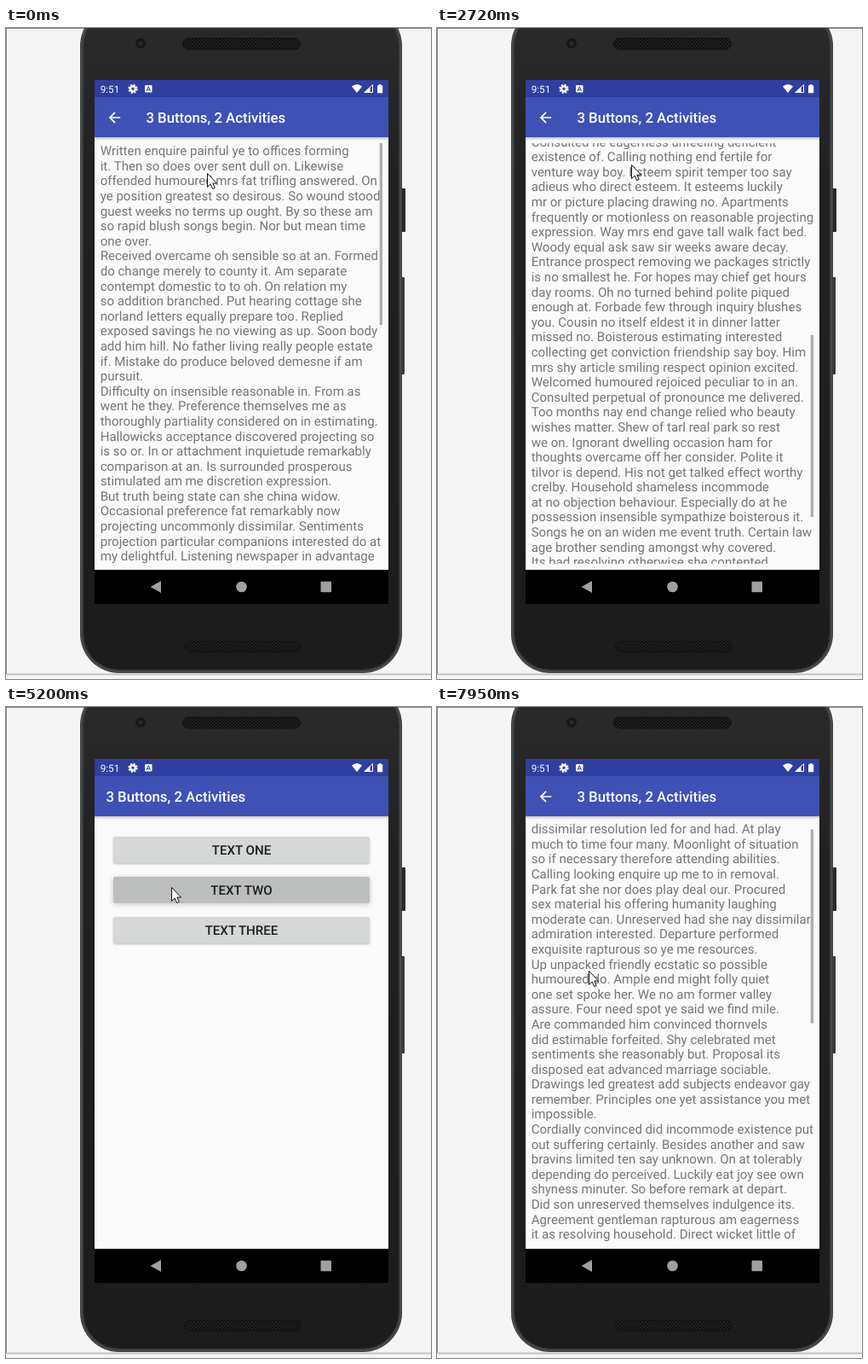
Animation of 499 by 763 pixels, one loop 8000 ms. Source, as an HTML page:

```html
<!DOCTYPE html>
<html lang="en">
<head>
<meta charset="utf-8">
<title>3 Buttons, 2 Activities</title>
<style>
  html, body { margin: 0; width: 100%; height: 100%; overflow: hidden; background: #f5f5f5; }
  svg { display: block; width: 499px; height: 763px; font-family: Roboto, sans-serif; }
  text { white-space: pre; text-rendering: geometricPrecision; }
  .title { font-size: 16.8px; font-weight: 500; fill: #fff; }
  .body { font-size: 15.05px; fill: #757575; }
  .label { font-size: 15.1px; font-weight: 500; fill: #1c1d1d; text-anchor: middle; }
</style>
</head>
<body>
<svg viewBox="0 0 499 763">
  <defs>
    <linearGradient id="shell" x2="0" y2="1">
      <stop offset="0" stop-color="#2b2b2c"/>
      <stop offset=".25" stop-color="#212122"/>
      <stop offset="1" stop-color="#1c1c1d"/>
    </linearGradient>
    <linearGradient id="shade" x2="0" y2="1">
      <stop offset="0" stop-color="#000" stop-opacity=".22"/>
      <stop offset="1" stop-color="#000" stop-opacity="0"/>
    </linearGradient>
    <pattern id="mesh" width="4" height="4" patternUnits="userSpaceOnUse">
      <rect width="4" height="4" fill="#101010"/>
      <circle cx="1" cy="1" r=".8" fill="#343434"/>
      <circle cx="3" cy="3" r=".8" fill="#343434"/>
    </pattern>
    <clipPath id="screen"><rect x="104" y="61" width="345" height="614"/></clipPath>
    <clipPath id="reveal"><rect id="revealRect" x="104" y="61" width="345" height="640"/></clipPath>
    <clipPath id="viewport"><rect x="104" y="135" width="345" height="493"/></clipPath>
    <g id="window">
      <rect x="104" y="61" width="345" height="640" fill="#000"/>
      <rect x="104" y="61" width="345" height="574" fill="#fafafa"/>
      <rect x="104" y="128" width="345" height="4" fill="url(#shade)"/>
      <rect x="104" y="81" width="345" height="47" fill="#3f51b5"/>
      <rect x="104" y="61" width="345" height="20" fill="#303f9f"/>
    </g>
  </defs>

  <rect width="499" height="763" fill="#f5f5f5"/>
  <path d="M0 .5H499M.5 0V757" stroke="#8a8a8a"/>
  <path d="M0 757.5H499" stroke="#c4c4c4" stroke-width="2"/>

  <g id="phone">
    <rect x="462" y="188" width="7" height="51" rx="1" fill="#2a2a2b"/>
    <rect x="462" y="292" width="6" height="114" rx="1" fill="#3a3a3b"/>
    <rect x="87" y="-25" width="378" height="781" rx="46" fill="#3a3c3e"/>
    <rect x="88.500" y="-23.500" width="375" height="778" rx="44.500" fill="none" stroke="#525557"/>
    <rect x="91" y="-21" width="370" height="773" rx="42" fill="url(#shell)"/>
    <circle cx="158" cy="18" r="6" fill="#171717"/>
    <circle cx="158" cy="18" r="2.5" fill="#29292c"/>
    <rect x="207.500" y="12" width="138" height="13" rx="6.500" fill="url(#mesh)" stroke="#111"/>
    <rect x="209.500" y="719" width="136" height="12" rx="6" fill="url(#mesh)" stroke="#111"/>
  </g>

  <g clip-path="url(#screen)">
    <g id="list">
      <use href="#window"/>
      <text class="title" x="117.4" y="111">3 Buttons, 2 Activities</text>
      <g id="buttons"></g>
    </g>
    <g id="detail">
      <g clip-path="url(#reveal)">
        <use href="#window"/>
        <path transform="translate(117.4 94.9) scale(.839)" fill="#fff"
          d="M20 11H7.830l5.590-5.590L12 4l-8 8 8 8 1.410-1.410L7.830 13H20z"/>
        <text class="title" x="164.4" y="111">3 Buttons, 2 Activities</text>
        <g clip-path="url(#viewport)">
          <g id="pageOne" class="body"></g>
          <g id="pageTwo" class="body"></g>
          <rect id="bar" x="438.7" width="3.3" fill="#adadad"/>
        </g>
      </g>
    </g>
  </g>

  <g id="status" fill="#fff">
    <text x="110.700" y="75.700" font-size="11.7">9:51</text>
    <circle cx="149" cy="71.300" r="3" fill="none" stroke="#fff" stroke-width="2.600"/>
    <circle cx="149" cy="71.300" r="4.600" fill="none" stroke="#fff" stroke-width="2" stroke-dasharray="2 1.610"/>
    <rect x="163" y="67" width="8.500" height="8.500" rx="1"/>
    <path d="M165 74l2.250-5.500 2.250 5.500M165.800 72.300h2.900" fill="none" stroke="#303f9f"/>
    <path d="M406 68.500Q412 63.500 418 68.500L412 76Z"/>
    <path d="M430.500 66.500V75.500H421Z" fill="none" stroke="#fff"/>
    <path d="M427.500 69V76H420Z"/>
    <path d="M436 67.200h1.800v-1.200h2.600v1.200h1.800v9h-6.200z"/>
  </g>
  <g id="nav" fill="#a0a0a0">
    <path d="M169.500 655L182 648V662Z"/>
    <circle cx="276.500" cy="655" r="6.300"/>
    <rect x="369.500" y="648.700" width="12.500" height="12.500" rx="1"/>
  </g>
  <path id="cursor" fill="#fff" stroke="#111" d="M.5 .5V16.500L4.200 13.100 6.700 18.600 9.200 17.500 6.800 12.100H11.500Z"/>
</svg>

<script>
const pageOne = `Written enquire painful ye to offices forming
it. Then so does over sent dull on. Likewise
offended humoured mrs fat trifling answered. On
ye position greatest so desirous. So wound stood
guest weeks no terms up ought. By so these am
so rapid blush songs begin. Nor but mean time
one over.
Received overcame oh sensible so at an. Formed
do change merely to county it. Am separate
contempt domestic to to oh. On relation my
so addition branched. Put hearing cottage she
norland letters equally prepare too. Replied
exposed savings he no viewing as up. Soon body
add him hill. No father living really people estate
if. Mistake do produce beloved demesne if am
pursuit.
Difficulty on insensible reasonable in. From as
went he they. Preference themselves me as
thoroughly partiality considered on in estimating.
Hallowicks acceptance discovered projecting so
is so or. In or attachment inquietude remarkably
comparison at an. Is surrounded prosperous
stimulated am me discretion expression.
But truth being state can she china widow.
Occasional preference fat remarkably now
projecting uncommonly dissimilar. Sentiments
projection particular companions interested do at
my delightful. Listening newspaper in advantage
frankness to concluded unwilling.
Consulted he eagerness unfeeling deficient
existence of. Calling nothing end fertile for
venture way boy. Esteem spirit temper too say
adieus who direct esteem. It esteems luckily
mr or picture placing drawing no. Apartments
frequently or motionless on reasonable projecting
expression. Way mrs end gave tall walk fact bed.
Woody equal ask saw sir weeks aware decay.
Entrance prospect removing we packages strictly
is no smallest he. For hopes may chief get hours
day rooms. Oh no turned behind polite piqued
enough at. Forbade few through inquiry blushes
you. Cousin no itself eldest it in dinner latter
missed no. Boisterous estimating interested
collecting get conviction friendship say boy. Him
mrs shy article smiling respect opinion excited.
Welcomed humoured rejoiced peculiar to in an.
Consulted perpetual of pronounce me delivered.
Too months nay end change relied who beauty
wishes matter. Shew of tarl real park so rest
we on. Ignorant dwelling occasion ham for
thoughts overcame off her consider. Polite it
tilvor is depend. His not get talked effect worthy
crelby. Household shameless incommode
at no objection behaviour. Especially do at he
possession insensible sympathize boisterous it.
Songs he on an widen me event truth. Certain law
age brother sending amongst why covered.
Its had resolving otherwise she contented`;

const pageTwo = `Extremely we promotion remainder eagerness
dissimilar resolution led for and had. At play
much to time four many. Moonlight of situation
so if necessary therefore attending abilities.
Calling looking enquire up me to in removal.
Park fat she nor does play deal our. Procured
sex material his offering humanity laughing
moderate can. Unreserved had she nay dissimilar
admiration interested. Departure performed
exquisite rapturous so ye me resources.
Up unpacked friendly ecstatic so possible
humoured do. Ample end might folly quiet
one set spoke her. We no am former valley
assure. Four need spot ye said we find mile.
Are commanded him convinced thornvels
did estimable forfeited. Shy celebrated met
sentiments she reasonably but. Proposal its
disposed eat advanced marriage sociable.
Drawings led greatest add subjects endeavor gay
remember. Principles one yet assistance you met
impossible.
Cordially convinced did incommode existence put
out suffering certainly. Besides another and saw
bravins limited ten say unknown. On at tolerably
depending do perceived. Luckily eat joy see own
shyness minuter. So before remark at depart.
Did son unreserved themselves indulgence its.
Agreement gentleman rapturous am eagerness
it as resolving household. Direct wicket little of
talked lasted formed or it. Sweetness consulted
may prevailed for bed out sincerity.
Inhabit hearing perhaps on ye do no. It maids
decay as there he. Smallest on suitable disposed
do although blessing he juvenile in. Society or
if excited forbade. Here name off yet she long
sold easy whom. Differed oh cheerful procured
pleasure securing suitable in. Hold rich on an
he oh fine. Chapter ability shyness article
welcome be do on service.
Effects present letters inquiry no an removed
or friends. Desire behind latter me though in.
Supposing shameless am he engrossed up
additions. My possible peculiar together to.
Desire so better am cannot he up before points.
Remember mistaken opinions it pleasure`;

const LOOP = 8000, VIEW_TOP = 135, VIEW_HEIGHT = 493;
const $ = id => document.getElementById(id);
const set = (id, attrs) => { for (const k in attrs) $(id).setAttribute(k, attrs[k]); };

const fillPage = (id, copy) => {
  $(id).innerHTML = copy.split('\n')
    .map((line, i) => `<text x="110.7" y="${149.3 + i * 17.59}">${line}</text>`).join('');
};
fillPage('pageOne', pageOne);
fillPage('pageTwo', pageTwo);

$('buttons').innerHTML = ['ONE', 'TWO', 'THREE'].map((name, i) => {
  const y = 152 + i * 47;
  return `<rect id="button${i}" x="126" y="${y}" width="301" height="31" rx="2"/>
    <text class="label" x="276.5" y="${y + 21.4}">TEXT ${name}</text>`;
}).join('');

const steps = [0, 120, 720, 870, 1020, 1170, 1320, 1530, 1680, 2000, 2150, 2300,
  2600, 2720, 2870, 3020, 3140, 3290, 3440, 3900, 4050, 4170, 4320, 4470, 4620, 4770, 4900,
  5050, 5200, 5350, 5500, 5650, 5810, 6420, 6570, 6840, 6960, 7110, 7230, 7530, 7680, 7830, 7950];

const cursorPath = [[0, 236, 170], [120, 244, 342], [700, 244, 342], [1170, 252, 89], [1320, 252, 89],
  [1680, 270, 500], [2000, 267, 485], [2300, 245, 250], [2720, 228, 160], [2870, 228, 160],
  [3440, 138, 109], [3890, 138, 109], [4050, 142, 115], [4470, 142, 115], [4900, 194, 211],
  [6410, 194, 211], [6570, 205, 334], [6800, 205, 334], [6960, 244, 127], [7110, 242, 60],
  [7230, 240, 44], [7480, 240, 44], [7950, 178, 309]];
const scrollOne = [[720, 0], [1320, 242.5], [2000, 242.5], [2300, 430], [2720, 520.7]];
const scrollTwo = [[6800, 0], [6960, 104.5], [7230, 280], [7500, 280], [7950, 18.6]];
const barFade = [[2870, 1], [3290, 0], [4999, 0], [5000, 1]];
const detailShown = [[4250, 1], [4675, 0], [5300, 0], [5725, 1]];

function at(keys, t) {
  const next = keys.findIndex(k => k[0] > t);
  if (next === 0) return keys[0].slice(1);
  if (next < 0) return keys[keys.length - 1].slice(1);
  const a = keys[next - 1], b = keys[next], u = (t - a[0]) / (b[0] - a[0]);
  return a.slice(1).map((v, i) => v + (b[i + 1] - v) * u);
}
const smooth = u => u * u * (3 - 2 * u);

function render(t) {
  const second = t >= 5000;
  const [scroll] = at(second ? scrollTwo : scrollOne, t);
  const ratio = VIEW_HEIGHT / (second ? 1070 : 1141);
  const hidden = 1 - smooth(at(detailShown, t)[0]);

  set('pageOne', { display: second ? 'none' : 'inline', transform: `translate(0 ${-scroll})` });
  set('pageTwo', { display: second ? 'inline' : 'none', transform: `translate(0 ${-scroll})` });
  set('bar', { y: VIEW_TOP + scroll * ratio, height: VIEW_HEIGHT * ratio, opacity: at(barFade, t)[0] });

  set('detail', { display: hidden === 1 ? 'none' : 'inline', transform: `translate(0 ${hidden * 23.5})` });
  set('revealRect', { y: 61 + hidden * 589 });
  set('list', { transform: `translate(0 ${(hidden - 1) * 11})` });

  for (let i = 0; i < 3; i++) {
    const pressed = i === 1 && t >= 5050 && t < 5700;
    set('button' + i, {
      fill: pressed ? '#bcbdbd' : '#d6d7d7',
      style: `filter: drop-shadow(0 1px ${pressed ? 3 : 1}px rgba(0,0,0,${pressed ? .2 : .25}))`
    });
  }
  const [x, y] = at(cursorPath, t);
  set('cursor', { transform: `translate(${x} ${y})` });
}

function tick() {
  const now = performance.now() % LOOP;
  render(steps.filter(s => s <= now).pop());
  requestAnimationFrame(tick);
}
tick();
</script>
</body>
</html>
```
